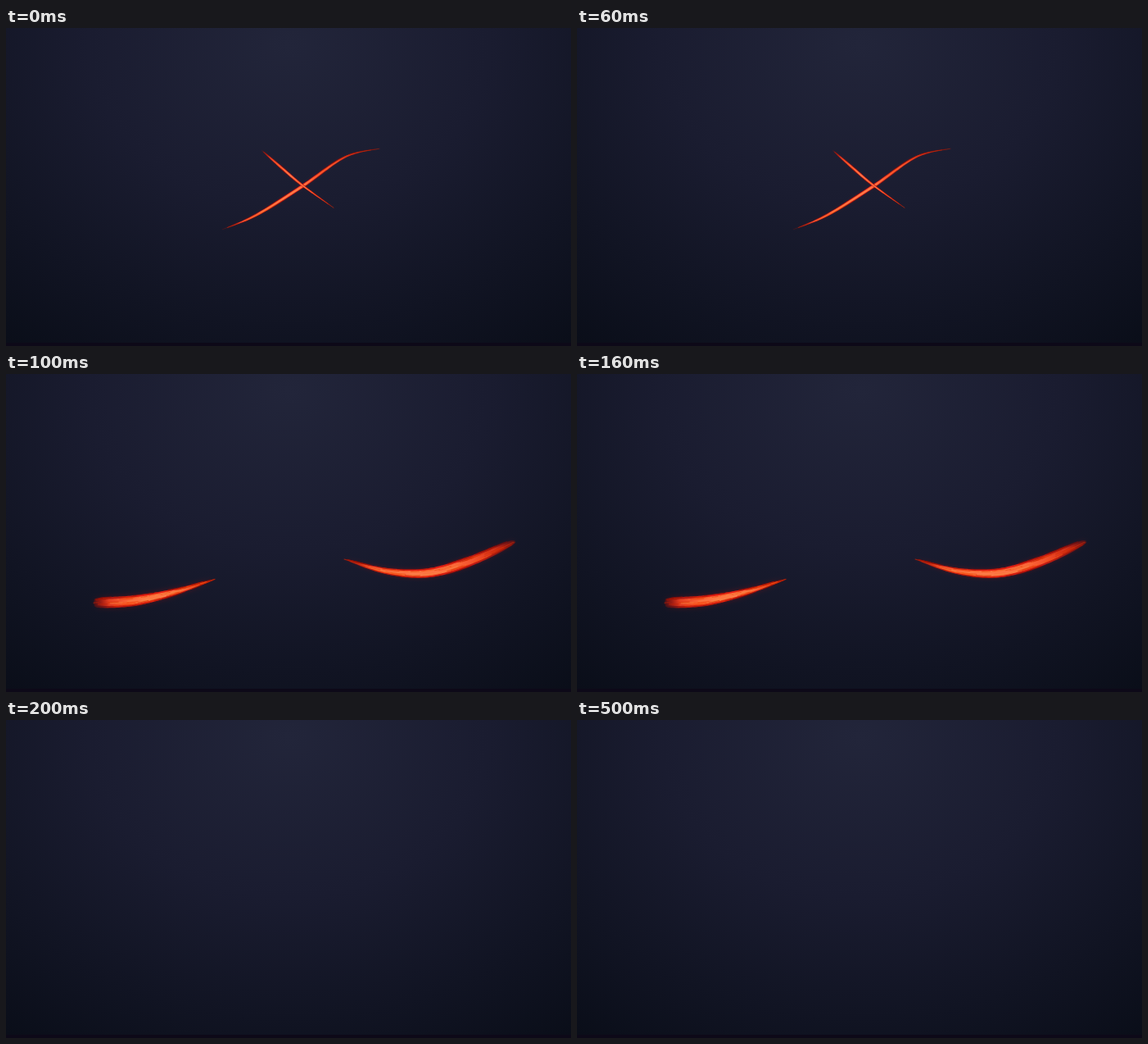
Recreate the animation shown at these times as an HTML page with a canvas. Size 690 by 388 pixels, loop 700 ms.

```html
<!DOCTYPE html>
<html lang="en">
<head>
<meta charset="utf-8">
<title>Glowing slashes</title>
<style>
  html, body { margin: 0; width: 100%; height: 100%; overflow: hidden; background: #11131f; }
  canvas { display: block; width: 690px; height: 388px; }
</style>
</head>
<body>
<canvas id="stage" width="690" height="388"></canvas>
<script>
const W = 690, H = 388, LOOP = 700;
const ctx = document.getElementById('stage').getContext('2d');

// width: thickest part; peak: where that is along the path;
// taper: how sharply it thins; hot: where it glows brightest.
const rising = {
  points: [[264, 246], [306, 228], [362, 193], [414, 157.5], [457, 147]],
  width: 4.2, peak: .46, taper: 3, hot: .38
};
const falling = {
  points: [[312, 149], [336, 170], [362, 192], [401, 220]],
  width: 3.2, peak: .42, taper: 2, hot: .5
};
const left = {
  points: [[107, 279.5], [157, 276.5], [206, 266], [256, 250]],
  width: 14, peak: .2, taper: 1.2, hot: .5
};
const right = {
  points: [[413, 226], [465, 240.5], [517, 242.5], [569, 227.5], [622, 204]],
  width: 12.5, peak: .66, taper: 1.3, hot: .42
};

const poses = [
  { until: 100, ribbons: [rising, falling] },
  { until: 200, ribbons: [left, right] },
  { until: LOOP, ribbons: [] }
];

function seeded(seed) {
  return () => (seed = (seed * 16807) % 2147483647) / 2147483647;
}

// Rises from 0 to 1 at the peak and falls back to 0.
function hump(t, peak, power) {
  return ((t / peak) ** peak * ((1 - t) / (1 - peak)) ** (1 - peak)) ** power;
}

function spline(points, t) {
  const n = points.length - 1;
  const i = Math.min(n - 1, Math.floor(t * n)), u = t * n - i;
  const at = k => points[Math.max(0, Math.min(n, k))];
  const [a, b, c, d] = [at(i - 1), at(i), at(i + 1), at(i + 2)];
  return b.map((p, k) => p + .5 * u * (c[k] - a[k] +
    u * (2 * a[k] - 5 * p + 4 * c[k] - d[k] + u * (3 * (p - c[k]) + d[k] - a[k]))));
}

// A spot on the ribbon; side runs from -1 to 1 across its width.
function spot({ points, width, peak, taper }, t, side) {
  const [x, y] = spline(points, t);
  const p = spline(points, Math.max(0, t - .01)), q = spline(points, Math.min(1, t + .01));
  const dx = q[0] - p[0], dy = q[1] - p[1], len = Math.hypot(dx, dy);
  const off = side * Math.max(.5, width * hump(t, peak, taper)) / 2;
  return [x - dy / len * off, y + dx / len * off];
}

function outline(ribbon, scale) {
  const path = new Path2D(), steps = 80;
  for (let i = 0; i <= steps; i++) path.lineTo(...spot(ribbon, i / steps, scale));
  for (let i = steps; i >= 0; i--) path.lineTo(...spot(ribbon, i / steps, -scale));
  path.closePath();
  return path;
}

const ember = heat => `hsl(${2 + 20 * heat} 92% ${27 + 36 * heat}%)`;
const rim = heat => `hsl(3 85% ${26 + 24 * heat}% / ${.4 + .6 * heat})`;
const core = heat => `hsl(${4 + 12 * heat} 100% ${46 + 18 * heat}% / ${heat})`;

function along({ points, hot }, tint) {
  const fill = ctx.createLinearGradient(...points[0], ...points[points.length - 1]);
  for (let t = 0; t <= 1; t += .125) fill.addColorStop(t, tint(hump(t, hot, 1)));
  return fill;
}

// Molten grain running along the ribbon, cooler toward the edges.
function drawGrain(ribbon) {
  const rand = seeded(7919);
  ctx.lineCap = 'round';
  ctx.lineWidth = .5 + ribbon.width * .05;
  ctx.globalAlpha = .6;
  for (let i = 0; i < ribbon.width * 7; i++) {
    const start = rand() * .9, span = .04 + rand() * .06, side = rand() * 2 - 1;
    const glow = hump(start + span / 2, ribbon.hot, 1) * (1 - side * side);
    ctx.strokeStyle = ember(Math.min(1, glow * (.6 + rand() * .6)));
    ctx.beginPath();
    for (let k = 0; k <= 6; k++) ctx.lineTo(...spot(ribbon, start + span * k / 6, side));
    ctx.stroke();
  }
}

function drawRibbon(ribbon) {
  ctx.save();
  ctx.shadowColor = 'rgba(170, 15, 22, .4)';
  ctx.shadowBlur = 1 + ribbon.width * .35;
  ctx.fillStyle = along(ribbon, rim);
  ctx.fill(outline(ribbon, .95));
  ctx.shadowBlur = 0;
  ctx.fillStyle = along(ribbon, core);
  ctx.fill(outline(ribbon, .6));
  drawGrain(ribbon);
  ctx.restore();
}

function drawBackdrop() {
  ctx.save();
  ctx.translate(W / 2, 20);
  ctx.scale(1.25, 1);
  const shade = ctx.createRadialGradient(0, 0, 0, 0, 0, 490);
  shade.addColorStop(0, '#22253a');
  shade.addColorStop(.4, '#1a1c30');
  shade.addColorStop(1, '#080c16');
  ctx.fillStyle = shade;
  ctx.fillRect(-W, -H, 2 * W, 2 * H);
  ctx.restore();
  ctx.fillStyle = '#0d0918';
  ctx.fillRect(0, 384, W, 4);
}

let shown = null;
function render(time) {
  const pose = poses.find(p => time % LOOP < p.until);
  if (pose === shown) return;
  drawBackdrop();
  pose.ribbons.forEach(drawRibbon);
  shown = pose;
}

const begin = performance.now();
function tick() {
  render(performance.now() - begin);
  requestAnimationFrame(tick);
}
tick();
</script>
</body>
</html>
```
